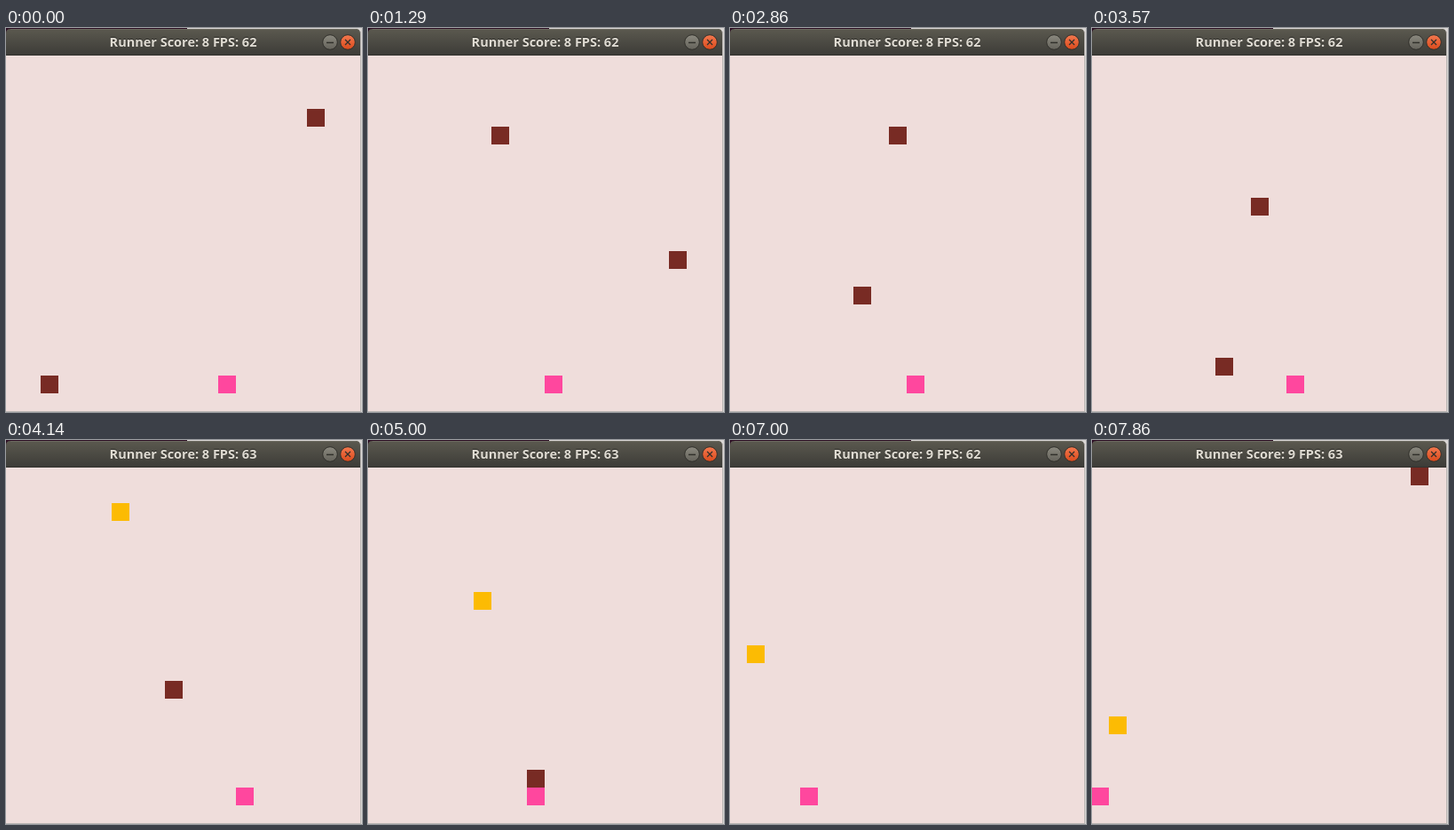
Write an HTML page that moves like this. It is 401 px wide and 432 px high and loops after 8 s.

```html
<!DOCTYPE html>
<html lang="en">
<head>
<meta charset="utf-8">
<title>Runner</title>
<style>
  html, body { margin: 0; width: 100%; height: 100%; overflow: hidden; background: #d9d6d4; }
  svg { display: block; }
  text { font: 700 14.5px "Open Sans", "Noto Sans", sans-serif; text-anchor: middle; }
</style>
</head>
<body>
<svg width="401" height="432" viewBox="0 0 401 432">
  <defs>
    <linearGradient id="bar" x2="0" y2="1">
      <stop offset="0" stop-color="#5b594f"/>
      <stop offset="1" stop-color="#3c3b37"/>
    </linearGradient>
    <linearGradient id="grey" x2="0" y2="1">
      <stop offset="0" stop-color="#8b897f"/>
      <stop offset="1" stop-color="#65635b"/>
    </linearGradient>
    <linearGradient id="orange" x2="0" y2="1">
      <stop offset="0" stop-color="#f4794f"/>
      <stop offset="1" stop-color="#da4a1c"/>
    </linearGradient>
    <clipPath id="view"><path d="M0 31H399V431H0Z"/></clipPath>
  </defs>
  <path fill="#d9d6d4" d="M0 0H401V432H0Z"/>
  <path fill="#2d0f24" d="M0 0H204V6H0Z"/>
  <path fill="#b9b5b3" d="M0 431H400V432H0ZM399 4H400V432H399Z"/>
  <path fill="url(#bar)" d="M0 31V6Q0 1 5 1H394Q399 1 399 6V31Z"/>
  <path fill="#6b695f" d="M5 1H394V2H5Z"/>
  <path fill="#33322e" d="M0 30H399V31H0Z"/>
  <text id="shade" x="199.5" y="20" fill="#2b2a26"></text>
  <text id="title" x="199.5" y="21" fill="#dfdbd2"></text>
  <g stroke="#31302b">
    <circle cx="365" cy="16" r="8.3" fill="url(#grey)"/>
    <circle cx="385" cy="16" r="8.3" fill="url(#orange)"/>
    <path d="M361 16.5H369M382 13L388 19M388 13L382 19" stroke-width="1.3" fill="none"/>
  </g>
  <path fill="#efdddb" d="M0 31H399V431H0Z"/>
  <g id="game" clip-path="url(#view)" shape-rendering="crispEdges"></g>
</svg>
<script>
const LOOP = 8000, CELL = 20, TOP = 31;
const BROWN = '#782b24', GOLD = '#fcbb03', PINK = '#ff479e';
const $ = id => document.getElementById(id);

function square(fill) {
  const el = document.createElementNS('http://www.w3.org/2000/svg', 'rect');
  el.setAttribute('width', CELL);
  el.setAttribute('height', CELL);
  el.setAttribute('fill', fill);
  return $('game').appendChild(el);
}

// x, colour, fall step at which it enters, rows it lives for
const blocks = [
  [39, BROWN, -18, 20],
  [339, BROWN, -3, 20],
  [139, BROWN, 4, 20],
  [179, BROWN, 13, 18],
  [119, GOLD, 23, 18],
  [19, GOLD, 33, 20],
  [359, BROWN, 47, 20]
].map(([x, fill, born, life]) => ({ x, born, life, el: square(fill) }));
const player = square(PINK);

// Ticks on which the blocks rest, and ticks on which the player steps
const rests = [3, 14, 18, 25, 33, 42, 47, 50, 54];
const lefts = [5, 7, 18, 32, 33, 34, 35, 40, 43, 44, 45, 48, 49, 51, 52, 54, 55];
const rights = [13, 25, 26, 28, 39];
const fpsFlips = [26, 39, 53];

const count = (list, tick) => list.filter(k => k <= tick).length;

function place(el, x, y, shown) {
  el.setAttribute('x', x);
  el.setAttribute('y', y);
  el.setAttribute('visibility', shown ? 'visible' : 'hidden');
}

function draw(ms) {
  const tick = Math.floor((Math.floor(ms / 10) + 0.5) * 0.07);
  const fallen = tick - count(rests, tick) + (tick >= 48 ? 1 : 0);
  for (const b of blocks) {
    const row = fallen - b.born;
    place(b.el, b.x, TOP + row * CELL, row >= 0 && row < b.life);
  }
  const steps = count(rights, tick) - count(lefts, tick);
  place(player, 239 + steps * CELL, 391, true);
  const score = tick >= 48 ? 9 : 8;
  const fps = 62 + count(fpsFlips, tick) % 2;
  $('title').textContent = $('shade').textContent = `Runner Score: ${score} FPS: ${fps}`;
}

const start = performance.now();
function loop(now) {
  draw(Math.max(0, now - start) % LOOP);
  requestAnimationFrame(loop);
}
draw(0);
requestAnimationFrame(loop);
</script>
</body>
</html>
```
